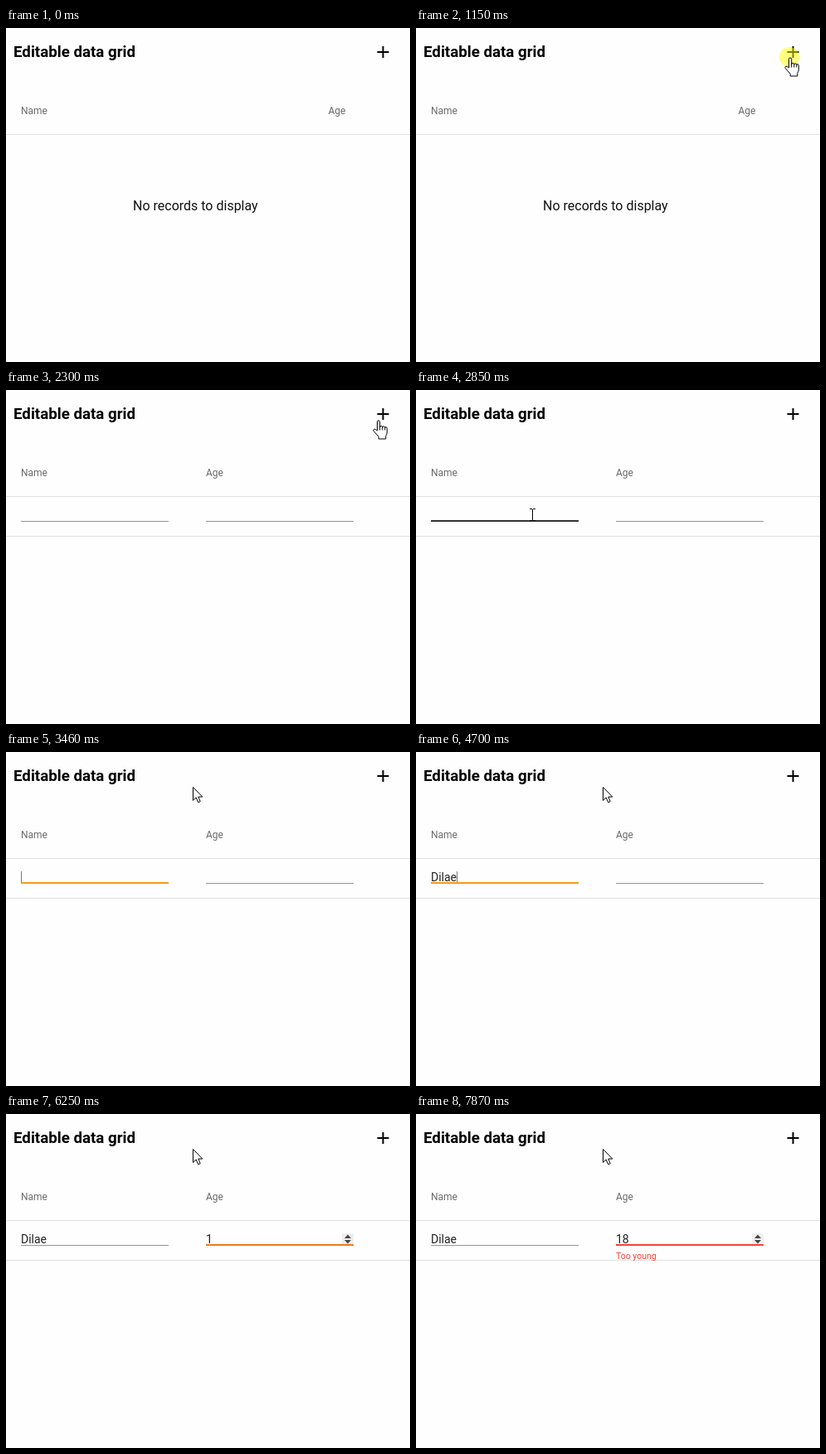
Write an HTML page that moves like this. It is 487 px wide and 403 px high and loops after 8000 ms.

```html
<!DOCTYPE html>
<html lang="en">
<head>
<meta charset="utf-8">
<title>Editable data grid</title>
<style>
  html, body { margin: 0; width: 100%; height: 100%; overflow: hidden; background: #fefefe; }
  svg { display: block; width: 487px; height: 403px; font-family: Roboto, sans-serif; }
  .title { font-size: 18.72px; font-weight: 700; }
  .head { font-size: 12px; fill: #6b6b6b; }
  .empty { font-size: 16px; fill: #111; }
  .input { font-size: 14px; fill: #222; }
  .error { font-size: 10.5px; fill: #f44336; }
  .rule { fill: #e0e0e0; }
  .thin { fill: #949494; }
  .outline { fill: #fff; stroke: #000; stroke-linejoin: round; }
</style>
</head>
<body>
<svg viewBox="0 0 487 403">
  <rect width="487" height="403" fill="#fefefe"/>
  <text class="title" x="9" y="35">Editable data grid</text>
  <circle id="ripple" cx="454" cy="28" r="20"/>
  <path d="M447.5 28h6v-6h2v6h6v2h-6v6h-2v-6h-6z"/>
  <text class="head" x="18" y="104">Name</text>
  <text class="head" id="ageHead" y="104">Age</text>
  <rect class="rule" y="128" width="487" height="1"/>
  <text class="empty" id="empty" x="153" y="220">No records to display</text>

  <g id="row">
    <rect class="rule" y="176" width="487" height="1"/>
    <text class="input" id="nameText" x="18" y="156"></text>
    <text class="input" id="ageText" x="241" y="156"></text>
    <g id="spinner">
      <rect x="405" y="144" width="14" height="13" fill="#efefef"/>
      <path d="M408 150l4-4.5 4 4.5zM408 152l4 4.5 4-4.5z" fill="#484848"/>
    </g>
    <rect id="caret" y="144" width="1" height="13" fill="#777"/>
    <rect class="thin" x="18" y="158" width="178" height="1"/>
    <rect class="thin" x="241" y="158" width="178" height="1"/>
    <rect id="hover" x="18" y="157" width="178" height="2"/>
    <rect id="nameFocus" y="157" height="2" fill="#f59b14"/>
    <rect id="ageFocus" y="157" height="2"/>
    <text class="error" id="error" x="241" y="175">Too young</text>
  </g>

  <circle id="click" r="12" fill="#ff0" fill-opacity=".5"/>
  <g id="pointer">
    <path class="outline" id="arrow" d="M.5 .5V16.5L4.2 13 6.7 18.8 9.2 17.7 6.8 12.1H11.8Z"/>
    <path class="outline" id="hand" transform="translate(-7 -1)" d="M5.5 13V2.5a1.6 1.6 0 0 1 3.2 0V9q.1-1.6 1.5-1.6t1.6 1.8q.2-1.3 1.5-1.3t1.5 1.7q.2-1 1.2-1t1.3 2V15q0 2.5-1.5 4.5V23H7.2V20.3L1.3 13.6q-1-1.6.4-2.3t2.6 1zM8.7 9v3.5M11.8 9.2v3.3M14.8 9.6v2.9"/>
    <path id="beam" d="M-3-7h3v1h1v-1h3v1h-3v13h3v1h-3v-1h-1v1h-3v-1h3v-13h-3z"/>
  </g>
</svg>
<script>
const LOOP = 8000;
const el = Object.fromEntries([...document.querySelectorAll('[id]')].map(e => [e.id, e]));

const nameSteps = [[0, ''], [3920, 'D'], [4320, 'Di'], [4550, 'Dil'], [4625, 'Dila'], [4700, 'Dilae']];
const ageSteps = [[0, ''], [5470, '1'], [7340, '18']];
const rippleSteps = [[0, 0], [1210, .05], [1290, .1], [1760, 0]];
const hoverSteps = [[0, 'none'], [2765, '#555'], [2842, '#333'], [2920, '#222'], [3080, '#111'], [3460, 'none']];
const nameFocusSteps = [[0, 0], [3310, .45], [3385, .88], [3460, 1], [5160, .75], [5235, .3], [5315, 0]];
const ageFocusSteps = [[0, 0], [5160, .2], [5235, .65], [5315, .92], [5390, 1]];
const ageColorSteps = [[0, '#f59b14'], [6250, '#ee7a1c'], [6330, '#ef5a28'], [6405, '#f44336']];
const caretSteps = [[0, 0], [3310, 1], [3770, 0], [3920, 1], [6020, 0], [6560, 1], [7110, 0], [7340, 1], [7870, 0]];

const at = (steps, t) => steps.findLast(([time]) => time <= t)[1];
const between = (t, from, to) => t >= from && t < to;
const show = (node, on) => node.setAttribute('visibility', on ? 'visible' : 'hidden');
const smooth = u => u * u * (3 - 2 * u);
const mix = (a, b, u, v = u) => [a[0] + (b[0] - a[0]) * u, a[1] + (b[1] - a[1]) * v].map(Math.round);

const ENTRY = [404, 353], BUTTON = [451, 36], FIELD = [140, 150], REST = [225, 42];

// The pointer was sampled about every 78 ms, so its moves are stepped.
function pointerAt(t) {
  if (t < 2300) {
    const u = Math.min(1, Math.floor((t - 360) / 79) / 8);
    return mix(ENTRY, BUTTON, u * u, u);
  }
  if (t < 3385) {
    const k = Math.floor((t - 2300) / 77.5);
    return mix(BUTTON, FIELD, smooth(Math.min(1, (k + .3) / 6.3)));
  }
  return t < 3460 ? mix(FIELD, REST, .6) : REST;
}

function drawPointer(t) {
  const [x, y] = pointerAt(t);
  const hand = Math.hypot(x - 454, y - 28) < 20;
  const beam = between(x, 18, 196) && between(y, 138, 160);
  show(el.hand, t >= 360 && hand);
  show(el.beam, t >= 360 && beam);
  show(el.arrow, t >= 360 && !hand && !beam);
  el.pointer.setAttribute('transform', `translate(${x} ${y})`);

  show(el.click, between(t, 1150, 1290) || between(t, 3230, 3385));
  el.click.setAttribute('cx', t < 2000 ? 450 : 140);
  el.click.setAttribute('cy', t < 2000 ? 35 : 150);
}

function drawFocus(bar, left, scale) {
  bar.setAttribute('x', left + 89 * (1 - scale));
  bar.setAttribute('width', 178 * scale);
}

function draw(t) {
  const editing = t >= 1990, onAge = t >= 5160;
  el.row.style.display = editing ? '' : 'none';
  show(el.empty, !editing);
  el.ageHead.setAttribute('x', editing ? 241 : 388.4);
  el.ripple.setAttribute('fill-opacity', at(rippleSteps, t));

  el.nameText.textContent = at(nameSteps, t);
  el.ageText.textContent = at(ageSteps, t);
  show(el.spinner, onAge);
  show(el.error, t >= 6330);

  const active = onAge ? el.ageText : el.nameText;
  const typed = editing && active.textContent ? active.getComputedTextLength() : 0;
  el.caret.setAttribute('x', Math.round((onAge ? 241 : 18) + typed));
  show(el.caret, at(caretSteps, t));

  el.hover.setAttribute('fill', at(hoverSteps, t));
  drawFocus(el.nameFocus, 18, at(nameFocusSteps, t));
  drawFocus(el.ageFocus, 241, at(ageFocusSteps, t));
  el.ageFocus.setAttribute('fill', at(ageColorSteps, t));
  drawPointer(t);
}

const start = performance.now();
function tick() {
  draw((performance.now() - start) % LOOP);
  requestAnimationFrame(tick);
}
tick();
</script>
</body>
</html>
```
